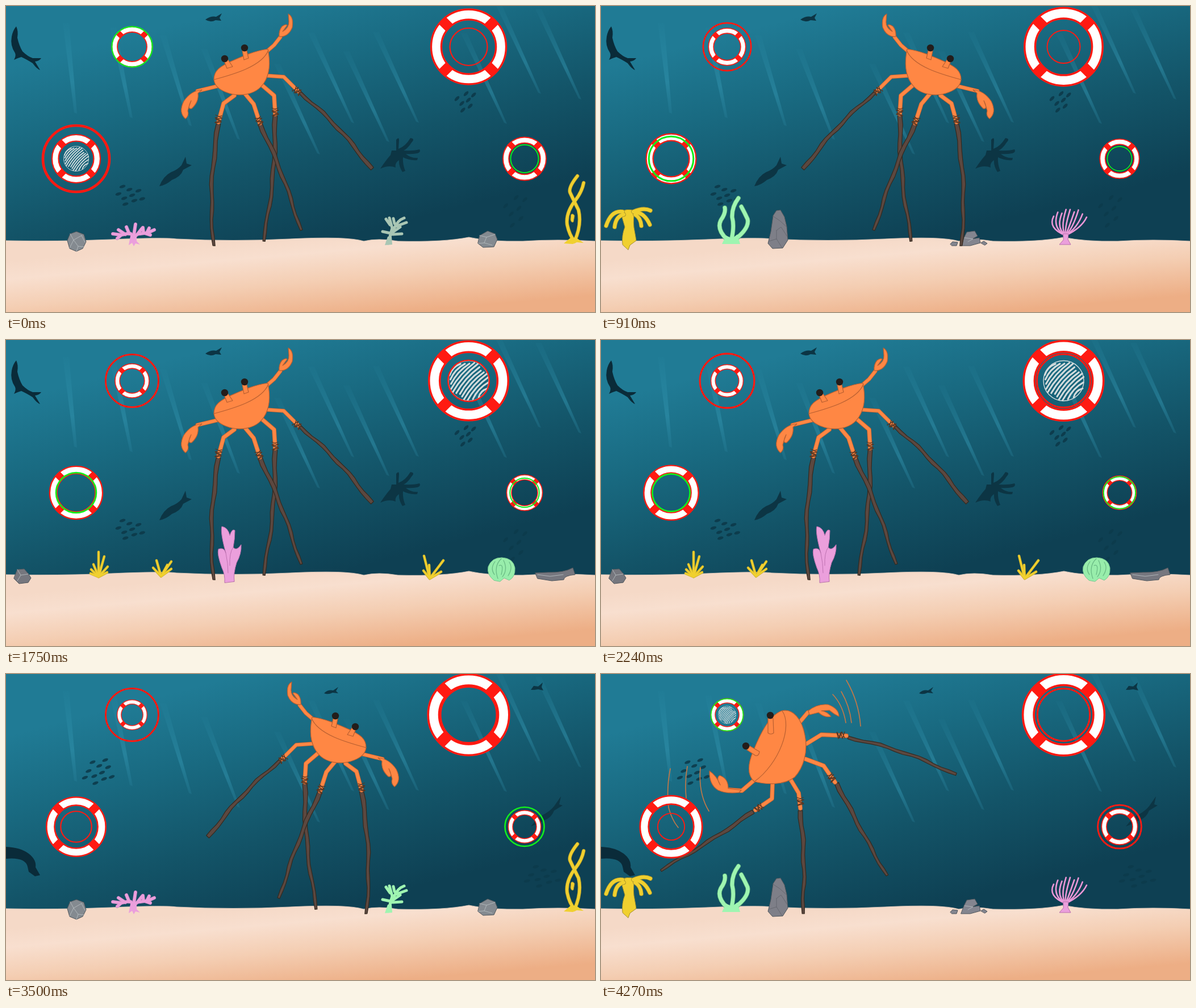
Animation of 1037x540 px, one loop 4.34 s. Source, as an HTML page:

```html
<!DOCTYPE html>
<html lang="en">
<head>
<meta charset="utf-8">
<title>Crab on stilts</title>
<style>
  html, body { margin: 0; width: 100%; height: 100%; overflow: hidden; background: #0f4a5e; }
  svg { display: block; width: 100%; height: 100%; }
  path { stroke-linecap: round; stroke-linejoin: round; }
</style>
</head>
<body>
<svg id="stage" viewBox="0 0 1037 540" preserveAspectRatio="none">
  <defs>
    <linearGradient id="water" gradientUnits="userSpaceOnUse" x1="420" y1="0" x2="530" y2="425">
      <stop offset="0" stop-color="#207b95"/><stop offset=".3" stop-color="#196a81"/>
      <stop offset=".65" stop-color="#135468"/><stop offset="1" stop-color="#0e4053"/>
    </linearGradient>
    <linearGradient id="sand" gradientUnits="userSpaceOnUse" x1="430" y1="412" x2="443" y2="562">
      <stop offset="0" stop-color="#f5d9c7"/><stop offset=".22" stop-color="#f8dfcf"/>
      <stop offset=".55" stop-color="#f4ceb3"/><stop offset="1" stop-color="#edae85"/>
    </linearGradient>
    <linearGradient id="ray" x1="0" y1="0" x2="0" y2="1">
      <stop offset="0" stop-color="#2f93ae" stop-opacity=".05"/>
      <stop offset=".65" stop-color="#3294af" stop-opacity=".5"/>
      <stop offset="1" stop-color="#2b86a1" stop-opacity=".25"/>
    </linearGradient>
  </defs>
  <rect width="1037" height="540" fill="url(#water)"/>
  <g id="rays" fill="url(#ray)"></g>
  <g id="shadows" fill="#0c3848"></g>
  <path d="M-2 414Q90 416 185 412T300 411Q400 416 500 411T630 415Q655 409 690 415Q770 417 815 408Q850 416 910 415Q970 411 1039 415V542H-2Z"
        fill="url(#sand)" stroke="#dccabd" stroke-width=".8"/>
  <g id="plants"></g>
  <g id="crab"></g>
  <g id="rings"></g>
</svg>
<script>
const LOOP = 4340, STEP = 70, FIRST_CHANGE = 350, SCENE_LENGTH = 1120;
const $ = id => document.getElementById(id);
const repeat = (n, draw) => Array.from({ length: n }, (_, i) => draw(i)).join('');

const path = (d, fill = 'none', stroke = 'none', width = 1) =>
  `<path d="${d}" fill="${fill}" stroke="${stroke}" stroke-width="${width}"/>`;
const outlined = (d, color, edge, width) => path(d, 'none', edge, width + 1.6) + path(d, 'none', color, width);
const scene = (on, body, attrs = '') => `<g data-on="${on}" ${attrs}>${body}</g>`;

// ---------- water ----------
// each ray is given by its lower end; rays further right lean more
function ray(end) {
  const [x, y] = end.split(',').map(Number), length = 160, lean = Math.min(.47, x / 1050) * length;
  return `<path d="M${x - lean - 5} ${y - length}h11L${x + 1} ${y}l-5 -2Z"/>`;
}
$('rays').innerHTML = '124,190 222,198 326,212 411,236 552,262 612,207 674,240 726,206 881,208 941,155 1012,165'
  .split(' ').map(ray).join('');

const SHADOW = '#0c3544', DEEP_SHADOW = '#0a2b39';
const school = (x, y, w, h, count, angle, opacity = .85) => `<g opacity="${opacity}">` + repeat(count, i => {
  const a = i * 2.4, d = Math.sqrt((i + .5) / count);
  return `<ellipse rx="5.5" ry="2.6" transform="translate(${x + w * d * Math.cos(a)} ${y + h * d * Math.sin(a)}) rotate(${angle})"/>`;
}) + '</g>';

$('shadows').innerHTML =
  scene('0 1 2',
    path('M18 36Q22 44 20 56Q23 70 29 80Q38 89 47 92L62 92Q59 97 51 98L60 113Q54 111 47 101Q36 94 27 90Q20 92 14 95Q18 88 16 83Q7 70 10 54Q12 43 18 36Z', DEEP_SHADOW) +
    path('M351 24Q361 17 370 19L380 13L376 21L379 26L369 25Q360 30 351 24Z', SHADOW) +
    path('M270 318Q277 300 291 293Q302 289 309 281L316 266L318 278L327 281L312 289Q308 301 292 307Q282 316 270 318Z', SHADOW) +
    path('M659 287Q669 272 677 263L679 255L687 255L687 236Q692 230 692 237L691 252Q703 248 712 233Q721 234 714 241Q707 252 700 255Q717 256 728 253Q731 258 724 260Q713 262 704 261Q713 269 725 268L724 272Q710 273 699 267Q698 279 703 291L698 293Q691 282 692 272Q684 277 686 285Q674 280 659 287Z', SHADOW) +
    school(809, 166, 19, 19, 7, -45) + school(216, 334, 26, 19, 9, -18) + school(897, 357, 22, 32, 7, -45, .55)) +
  scene('3 4',
    path('M560 34Q567 27 576 29L585 23L581 30L585 34L575 33Q567 37 560 34Z', SHADOW) +
    path('M924 28L929 21L937 22L945 15L943 23L946 29L937 27L930 28Z', SHADOW) +
    path('M0 305Q26 306 40 317Q54 328 52 341L60 355L51 357L40 349L38 340Q34 323 0 326Z', DEEP_SHADOW) +
    path('M924 269Q937 252 950 246Q963 238 968 229L977 216L974 230L980 232L965 241Q960 254 948 258Q940 263 924 269Z', SHADOW) +
    school(163, 174, 28, 25, 11, -22) + school(945, 357, 31, 22, 10, -12, .6));

// ---------- sea floor ----------
const YELLOW = '#f0d02f', YELLOW_EDGE = '#a5912c', PINK = '#eb9fdc', PINK_EDGE = '#b96eac',
      GREEN = '#9ff5b1', GREEN_EDGE = '#58a878', STONE = '#848a90', STONE_EDGE = '#4f565c';

const rock = (d, cracks, color = STONE, crackColor = '#b4babe') => path(d, color, STONE_EDGE) + path(cracks, 'none', crackColor, .9);
const blades = (x, y, tips) => outlined(tips.split(' ').map(p => `M${x} ${y}L${p}`).join(''), YELLOW, '#cbae28', 3);

const greenCoral = color => path('M673 419Q677 402 680 392L675 374M677 401L663 398M676 386L669 376M677 405L684 391Q690 378 701 374M686 389L705 382M681 403L697 402M681 399L694 390M684 384L682 375',
  'none', color, 5) + path('M667 422L672 407L679 407L680 421Z', color);

const reef = greenTone =>
  rock('M113 402L124 398L137 403L141 416L135 428L124 433L112 428L108 414Z', 'M113 402L119 413L112 427M119 413L133 405M119 413L127 424L137 425M127 424L124 433M133 405L139 417') +
  outlined('M223 411Q223 402 217 401L203 404L188 402M210 403L198 395M203 404L196 410M226 410Q228 402 236 402L250 400L261 395M245 401L254 404M242 400L241 391M225 405L228 385M217 402L212 390M232 402L239 393M248 400L252 392', PINK, '#c987c2', 4.5) +
  path('M219 406H230V415L236 421L228 419L225 424L222 418L216 422Z', PINK) +
  greenCoral(greenTone) +
  rock('M834 405L848 397L861 402L865 412L859 425L840 426L831 419Z', 'M834 405L846 408L861 403M846 408L842 418L832 419M842 418L856 422') +
  outlined('M1006 300Q990 320 993 329Q999 342 1008 360Q1014 386 1001 415M1017 312Q1014 328 1003 342Q985 365 988 386Q992 405 1001 415', YELLOW, YELLOW_EDGE, 5) +
  path('M995 368Q998 365 1001 370L999 381Q995 383 994 377Z', YELLOW, YELLOW_EDGE) +
  path('M982 419L994 409L1004 409L1017 418L1005 417L998 420Z', YELLOW);

const tentacles = repeat(9, i => {
  const a = i / 4 - 1;
  return `M818 405Q${816 + a * 30} 392 ${826 + a * 29} ${360 + 11 * a * a + 3 * Math.sin(i * 4)}`;
});

const meadow =
  path('M38 421Q36 405 42 390Q38 376 34 363Q45 357 60 361Q56 374 58 391Q61 407 62 414L51 422L48 430Z', YELLOW, YELLOW_EDGE) +
  outlined('M38 363Q18 360 9 388M40 368Q26 371 24 390M57 363Q75 355 87 361M62 364Q77 366 86 386M60 368Q70 374 71 388', YELLOW, YELLOW_EDGE, 6) +
  outlined('M222 412Q203 394 211 378Q220 365 218 356M230 411Q235 388 231 373Q230 355 242 339M236 412Q262 392 258 376Q253 365 247 354', GREEN, GREEN_EDGE, 6.5) +
  path('M213 420L220 405L231 410L240 403L245 420Z', GREEN) +
  rock('M309 361L316 360L323 372L327 389L329 413L320 427L302 428L294 419L299 398L303 370Z', 'M303 371L315 379L327 390M309 396L317 390L328 407M296 415L309 411L319 427M309 396L309 411', '#7e7f88', '#64666e') +
  rock('M639 409L644 399L658 397L663 406L654 411L666 409L668 418L650 423H634ZM615 420L619 416L628 417L626 423L618 423ZM669 418L674 415L680 419L676 422Z', 'M640 409L655 411L646 416', '#83858f') +
  path(tentacles, 'none', PINK_EDGE, 2.8) + path(tentacles, 'none', PINK, 1.9) +
  path('M814 402H823L822 412L827 421H807L814 413Z', PINK, PINK_EDGE);

const garden =
  rock('M20 405L32 404L39 412L44 420L39 428L23 430L14 421Z', 'M20 405L26 415L39 413M26 415L20 425', '#76777e') +
  blades(163, 418, '163,374 173,382 150,405 154,396 179,400 178,410 149,412') +
  blades(273, 417, '265,389 291,391 259,402 291,404 284,397') +
  blades(746, 421, '736,381 770,389 745,397 735,407 766,409') +
  path('M385 428Q386 414 380 402Q371 377 374 369Q384 365 387 376Q377 340 380 329Q391 331 394 345Q398 332 403 336Q403 351 400 366Q406 373 414 361Q415 377 406 393Q400 412 402 426Z', PINK, PINK_EDGE) +
  path('M387 376Q391 394 391 411M400 366Q393 375 394 398', 'none', PINK_EDGE, .9) +
  path('M859 424Q846 414 849 400Q855 384 873 384Q893 385 896 402Q897 418 886 424L877 420L870 426Z', '#98edab', '#75c890') +
  path('M872 386Q858 399 866 421M861 391Q852 403 860 414M876 389Q884 405 874 418M886 392Q893 402 884 416M868 398Q877 394 872 414', 'none', '#68b883', 1.2) +
  rock('M932 411L954 410Q981 411 998 402L1002 414Q982 416 982 423L961 425L936 421Z', 'M936 414L958 417L981 414', '#76777f');

$('plants').innerHTML = scene('0', reef('#a9c6b4')) + scene('3', reef(GREEN)) + scene('1 4', meadow) + scene('2', garden);

// ---------- crab ----------
const ORANGE = '#ff8744', EDGE = '#b75f31';
const shape = d => path(d, ORANGE, EDGE, 1.2);
const limb = (d, w = 6.2) => outlined(d, ORANGE, EDGE, w);
const eye = (x, y) => `<circle cx="${x}" cy="${y}" r="6.2" fill="#231d1b"/>`;
const lace = (x, y, angle) => `<g transform="translate(${x} ${y}) rotate(${angle})">` +
  path('M-6 -7L6 -3L-5 0L6 4L-5 7M5 -7L-6 -2L5 2L-5 6', 'none', '#583521', 1.3) + '</g>';

// a knobbly, tapering branch that bows sideways by `bend`
function stick(x1, y1, x2, y2, bend, w1 = 7.5, w2 = 4.5) {
  const length = Math.hypot(x2 - x1, y2 - y1), nx = (y1 - y2) / length, ny = (x2 - x1) / length, n = 14;
  const edge = (side, u) => {
    const off = bend * Math.sin(Math.PI * u) + 1.2 * Math.sin(u * 17) + side * (w1 + (w2 - w1) * u + .7 * Math.sin(u * 29)) / 2;
    return `${x1 + (x2 - x1) * u + nx * off} ${y1 + (y2 - y1) * u + ny * off}`;
  };
  return path('M' + repeat(n + 1, i => edge(1, i / n) + 'L') + repeat(n + 1, i => edge(-1, 1 - i / n) + (i < n ? 'L' : 'Z')),
    '#5c4840', '#35291f', 1.2);
}

const standing =
  stick(374, 208, 365, 423, 7) + stick(474, 194, 453, 415, -6) +
  stick(447, 207, 519, 396, -4) + stick(518, 153, 644, 288, -6, 5, 7) +
  limb('M402 158L383 172L374 205') + limb('M421 155L436 173L447 207') +
  limb('M451 140L472 158L474 191') + limb('M460 123L489 125L515 151', 5.5) +
  lace(374, 200, 8) + lace(446, 203, -20) + lace(474, 187, 0) + lace(513, 150, -50) +
  limb('M374 141L337 150', 5.5) + limb('M457 82L472 69L483 55', 5.5) +
  shape('M345 148Q326 149 313 168Q303 188 316 199Q323 193 320 185Q322 177 326 167Q318 183 327 181Q340 169 338 154Z') +
  shape('M481 54Q480 43 486 36Q493 31 495 34L487 45Q499 38 498 27L497 14Q507 19 504 38Q497 55 481 54Z') +
  shape('M366 130C366 113 378 107 393 99C420 87 438 79 461 76C465 95 466 118 454 136C440 158 409 161 387 152C374 147 367 139 366 130Z') +
  path('M366 130C395 122 450 108 462 78', 'none', EDGE, 1.2) +
  shape('M384 97L391 95L399 107L389 110Z') + shape('M416 79L424 79L427 92L419 95Z') + eye(385, 93) + eye(420, 74);

const falling =
  stick(268, 243, 105, 346, -2.5, 7, 4) + stick(351, 241, 355, 423, -4) +
  stick(415, 193, 503, 356, 1) + stick(435, 112, 625, 178, -7, 5, 5) +
  limb('M302 194L301 220L272 240') + limb('M333 185L348 210L351 237') +
  limb('M360 150L392 162L412 191') + limb('M362 123L388 107L432 109') +
  lace(278, 236, 55) + lace(351, 225, 0) + lace(406, 183, -30) + lace(422, 108, 90) +
  limb('M270 187L248 206L222 204') + limb('M349 86L364 68L383 62') +
  shape('M243 209Q222 212 206 205Q190 195 191 171Q204 180 210 196Q202 183 209 179Q224 184 224 202L247 205Z') +
  shape('M365 65Q381 52 400 54Q419 61 419 75Q410 71 402 64L388 65Q398 66 405 75Q394 78 383 68L367 72Z') +
  shape('M318 65C338 60 354 80 359 108C365 138 356 166 341 182C322 197 290 195 270 190C255 177 260 155 268 136C280 106 296 73 318 65Z') +
  path('M319 65C338 92 314 158 270 190', 'none', EDGE, 1.2) +
  shape('M294 78L303 78L304 104Q299 108 294 104Z') + shape('M257 134L262 127L279 137Q278 145 272 144Z') +
  eye(298, 73) + eye(255, 127) +
  path('M408 36Q426 55 431 86M423 31Q438 57 441 86M432 11Q454 49 457 92M122 167Q115 202 119 236Q125 258 136 271M152 163Q147 190 150 219M175 165Q171 211 190 242', 'none', '#c77846', 1.6);

$('crab').innerHTML = scene('0 2', standing) +
  scene('1 3', standing, 'transform="matrix(-1 0 0 1 1000 0)"') + scene('4', falling);

// ---------- lifebuoys ----------
const ramp = (t, from, to) => Math.min(1, Math.max(0, (t - from) / (to - from)));

// Radii by time in seconds. The pulse turns green while it lies on the buoy, from the ratio `inner` outwards.
// The chalk ball shows from `hit[0]` to `hit[1]`, while the pulse jumps back to the buoy.
const RINGS = [
  { x: 222, y: 72, inner: .7, line: .065, ball: 15.5, hit: [3.8, 4.34],
    buoy: t => 26 + 3.3 * Math.abs(t - 3.2),
    pulse: t => 35.7 + 12.5 * Math.sin(.6 * t) - 15 * ramp(t, 3.8, 4.3) },
  { x: 123.5, y: 269.5, inner: .64, line: .08, ball: 22, hit: [0, .5],
    buoy: t => 42.8 + 3.3 * Math.abs(t - .25),
    pulse: t => 43.5 - 4.65 * t + 15 * (1 - ramp(t, 0, .5)) },
  { x: 814.5, y: 72, inner: .7, line: .065, ball: 35.5, hit: [1.33, 2.55],
    buoy: t => 67.7 + 2.9 * Math.sqrt(t),
    pulse: t => 33 - 4.4 * t + 32 * ramp(t, 1.33, 2.55) },
  { x: 913, y: 269.5, inner: .58, line: .075, ball: 0, hit: [0, 0],
    buoy: t => 27.6 + 3.8 * Math.abs(t - 3),
    pulse: t => 20.8 + 5 * Math.abs(t - .75) }
];

const scribble = repeat(12, i => {
  const y = -.9 + i * .165, half = Math.sqrt(1 - y * y) * (.88 + .1 * Math.sin(i * 5));
  return `M${-half} ${y}Q0 ${y - .16} ${half} ${y + .05}`;
});

$('rings').innerHTML = RINGS.map(r => `<g transform="translate(${r.x} ${r.y})">
  <g class="buoy" fill="none" stroke="#ff1a12">
    <circle r=".843" stroke-width=".314"/><circle r=".843" stroke="#fff" stroke-width=".215"/>
    <path d="M.5 .5L.68 .68M-.5 .5L-.68 .68M.5 -.5L.68 -.68M-.5 -.5L-.68 -.68" stroke-width=".26" style="stroke-linecap:butt"/>
  </g>
  <g class="ball" transform="scale(${r.ball})" fill="none" stroke="#d3dcdd">
    <circle r="1" stroke-width=".04"/><path d="${scribble}" transform="rotate(-50)" stroke-width=".085"/>
  </g>
  <circle class="pulse" fill="none"/></g>`).join('');

const parts = RINGS.map((r, i) => ['buoy', 'ball', 'pulse'].map(name => $('rings').children[i].querySelector('.' + name)));
const scenes = [...document.querySelectorAll('[data-on]')].map(el => ({ el, on: el.dataset.on.split(' ').map(Number) }));

function drawRing(ring, [buoy, ball, pulse], t) {
  const size = ring.buoy(t), radius = ring.pulse(t), ratio = radius / size;
  buoy.setAttribute('transform', `scale(${size})`);
  pulse.setAttribute('r', radius);
  pulse.setAttribute('stroke-width', radius * ring.line);
  pulse.setAttribute('stroke', ratio > ring.inner && ratio < 1.18 ? '#12f01c' : '#ff1a12');
  ball.style.display = t >= ring.hit[0] && t < ring.hit[1] ? '' : 'none';
}

const start = performance.now();
function frame() {
  const t = Math.floor((performance.now() - start) % LOOP / STEP) * STEP;
  const current = Math.floor((t - FIRST_CHANGE) / SCENE_LENGTH) + 1;
  scenes.forEach(s => s.el.style.display = s.on.includes(current) ? '' : 'none');
  RINGS.forEach((r, i) => drawRing(r, parts[i], t / 1000));
  requestAnimationFrame(frame);
}
frame();
</script>
</body>
</html>
```
